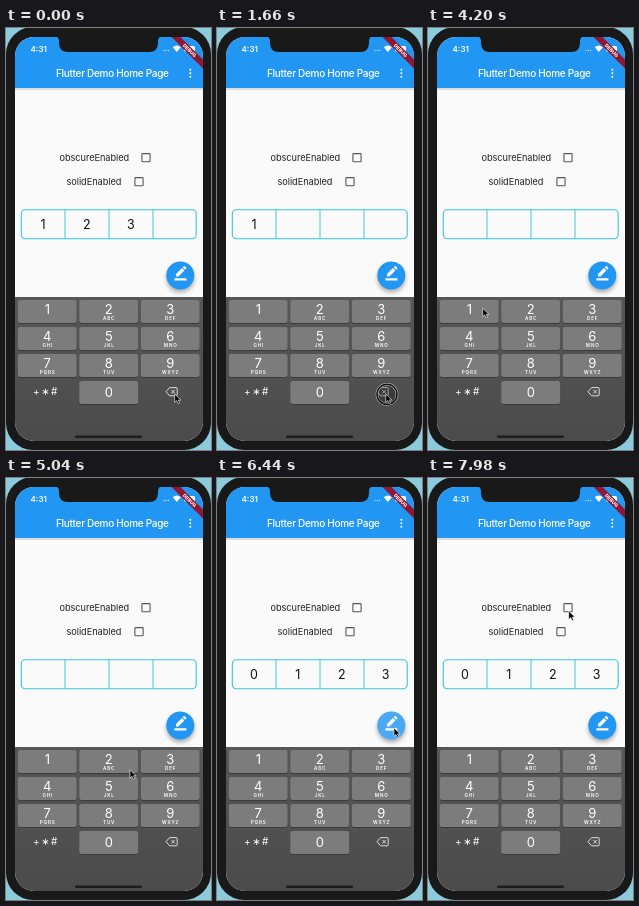
These frames come from a looping animation (205 by 422 pixels, 8 s). An HTML page:

```html
<!DOCTYPE html>
<html lang="en">
<head>
<meta charset="utf-8">
<title>PIN input demo</title>
<style>
html, body { margin: 0; width: 100%; height: 100%; overflow: hidden; background: #8ccbdc; }
svg { display: block; width: 100vw; height: 100vh; }
text { font-family: Inter, Roboto, sans-serif; }
.mid { text-anchor: middle; }
.label { font-size: 9.2px; letter-spacing: -.05px; fill: #222; }
.digit { font-size: 12.5px; fill: #111; }
.key { font-size: 13px; fill: #fff; }
.sub { font-size: 4.6px; font-weight: 600; letter-spacing: .8px; fill: #fff; }
</style>
</head>
<body>
<svg viewBox="0 0 205 422" preserveAspectRatio="none">
  <defs>
    <clipPath id="screen"><rect x="9" y="9" width="188" height="404" rx="19"/></clipPath>
    <clipPath id="fabClip"><circle cx="174.3" cy="247.5" r="14"/></clipPath>
    <linearGradient id="board" x2="0" y2="1">
      <stop stop-color="#575757"/><stop offset="1" stop-color="#4b4b4b"/>
    </linearGradient>
    <filter id="soft" x="-50%" y="-50%" width="200%" height="200%"><feGaussianBlur stdDeviation="2"/></filter>
  </defs>

  <rect x="0" y="-1" width="205" height="423" rx="27" fill="#191919"/>
  <g clip-path="url(#screen)">
    <rect x="9" y="9" width="188" height="404" fill="#fafafa"/>
    <rect x="9" y="60" width="188" height="2" fill="#000" opacity=".12"/>
    <rect x="9" y="9" width="188" height="51" fill="#2196f3"/>
    <g fill="#fff">
      <text x="24.5" y="24" font-size="8" font-weight="600">4:31</text>
      <text x="50" y="49" font-size="10" font-weight="500" letter-spacing="-.3">Flutter Demo Home Page</text>
      <circle cx="184.3" cy="41.8" r="1"/><circle cx="184.3" cy="45.3" r="1"/><circle cx="184.3" cy="48.8" r="1"/>
      <g opacity=".7"><circle cx="158" cy="22.5" r=".7"/><circle cx="160.3" cy="22.5" r=".7"/><circle cx="162.6" cy="22.5" r=".7"/></g>
      <path d="M166.8 19.3q4-3.4 8 0L170.8 24z"/>
      <rect x="178" y="18" width="11" height="5.5" rx="1.5"/>
    </g>
    <g transform="translate(183.5 22.5) rotate(45)">
      <rect x="-32" y="-3.2" width="64" height="6.4" fill="#8f1733"/>
      <text class="mid" y="1.7" font-size="4.8" font-weight="800" fill="#fff">DEBUG</text>
    </g>
    <path d="M49 8h107q-4 1-4 5v2q0 9-9 9H62q-9 0-9-9v-2q0-4-4-5z" fill="#191919"/>

    <text class="label" x="53.5" y="133">obscureEnabled</text>
    <text class="label" x="60.5" y="157">solidEnabled</text>
    <g fill="none" stroke="#555" stroke-width="1.1">
      <rect x="135.9" y="125.6" width="8.2" height="8.2" rx=".8"/>
      <rect x="128.9" y="149.6" width="8.2" height="8.2" rx=".8"/>
    </g>
    <path d="M59 182v29M103 182v29M147 182v29" stroke="#3fcbe0"/>
    <rect x="15.3" y="181.8" width="174.9" height="29" rx="4" fill="none" stroke="#32c7dd" stroke-width="1.1"/>
    <g id="digits"></g>

    <circle cx="174.3" cy="250.5" r="14" fill="#000" opacity=".3" filter="url(#soft)"/>
    <circle cx="174.3" cy="247.5" r="14" fill="#2196f3"/>
    <g clip-path="url(#fabClip)"><circle id="ripple" cx="177" cy="250" fill="#fff"/></g>
    <path d="M170 248.4v-2.4l6-6 2.4 2.4-6 6zM176.7 239.3l1.1-1.1q.5-.4 1 0l1.4 1.4q.4.5 0 1l-1.1 1.1zM168.4 250.2h12v2.3h-12z" fill="#fff"/>

    <rect x="9" y="269" width="188" height="145" fill="url(#board)"/>
    <g id="keys"></g>
    <text class="mid" x="40" y="366.5" font-size="10" letter-spacing="1.5" fill="#fff">+∗#</text>
    <path d="M160 363.7l3.6-4.1h6.6q1 0 1 1v6.2q0 1-1 1h-6.6zM165.3 361.9l3.6 3.6M168.9 361.9l-3.6 3.6" fill="none" stroke="#fff" stroke-width=".8"/>
    <rect x="69" y="407.5" width="67" height="2.6" rx="1.3" fill="#1d1d1d"/>
  </g>

  <g id="press">
    <circle r="10" fill="#000" fill-opacity=".25" stroke="#ccc" stroke-width="2.6"/>
    <circle r="10" fill="none" stroke="#111" stroke-width="1.6"/>
  </g>
  <path id="cursor" d="M0 0v8.4l2-1.8 1.4 3 1.5-.7-1.4-2.9h2.7z" fill="#000" stroke="#fff" stroke-width=".6"/>
</svg>
<script>
const LOOP = 8000;
const $ = id => document.getElementById(id);

// Keypad
const letters = ['', 'ABC', 'DEF', 'GHI', 'JKL', 'MNO', 'PQRS', 'TUV', 'WXYZ'];
const key = (n, col, row, sub) => {
  const x = 11.7 + col * 61.5, y = 272 + row * 27, cx = x + 29.6;
  return `<rect x="${x}" y="${y + .8}" width="59" height="23" rx="2.5" fill="#333"/>
    <rect x="${x}" y="${y}" width="59" height="23" rx="2.5" fill="#7c7c7c"/>
    <text class="key mid" x="${cx}" y="${y + (row == 3 ? 16.3 : 13.5)}">${n}</text>
    <text class="sub mid" x="${cx + .4}" y="${y + 19.8}">${sub}</text>`;
};
$('keys').innerHTML = letters.map((s, i) => key(i + 1, i % 3, i / 3 | 0, s)).join('') + key(0, 1, 3, '');

$('digits').innerHTML = [0, 1, 2, 3].map(i =>
  `<text class="digit mid" x="${37 + i * 43.9}" y="200.8"></text>`).join('');
const cells = [...$('digits').children];

// Pointer stops: time, x, y
const path = [
  [0, 168.7, 366], [2520, 168.7, 366], [2960, 107, 317], [3340, 78, 289], [3760, 55, 281],
  [4340, 54.6, 280], [4700, 78, 294], [5160, 140, 291], [5560, 175, 254], [5760, 177, 250],
  [6440, 177, 250], [6760, 168, 226], [6880, 167, 223.5], [7200, 153, 177], [7560, 141, 134], [LOOP, 140.7, 133]
];
// Press times, each shown for HOLD ms
const presses = [520, 1100, 1640, 5960], HOLD = 300;
// Field contents from each time on
const values = [[0, '123'], [680, '12'], [1240, '1'], [1820, ''], [6160, '0123']];

const clamp = v => Math.max(0, Math.min(1, v));

function pointer(t) {
  const i = path.findIndex(p => p[0] > t);
  const [t0, x0, y0] = path[i - 1], [t1, x1, y1] = path[i];
  const u = (t - t0) / (t1 - t0);
  return [x0 + (x1 - x0) * u, y0 + (y1 - y0) * u];
}

function draw(t) {
  const [x, y] = pointer(t);
  $('cursor').setAttribute('transform', `translate(${x} ${y})`);
  $('press').setAttribute('transform', `translate(${x + 1.3} ${y + .3})`);
  $('press').style.opacity = presses.some(p => t >= p && t < p + HOLD) ? 1 : 0;

  const value = values.filter(v => v[0] <= t).pop()[1];
  cells.forEach((c, i) => c.textContent = value[i] || '');

  const r = (t - 5980) / 360;
  $('ripple').setAttribute('r', 24 * clamp(r));
  $('ripple').style.opacity = r > 0 ? .25 * clamp(2 - r) : 0;
}

function tick() {
  draw(performance.now() % LOOP);
  requestAnimationFrame(tick);
}
tick();
</script>
</body>
</html>
```
